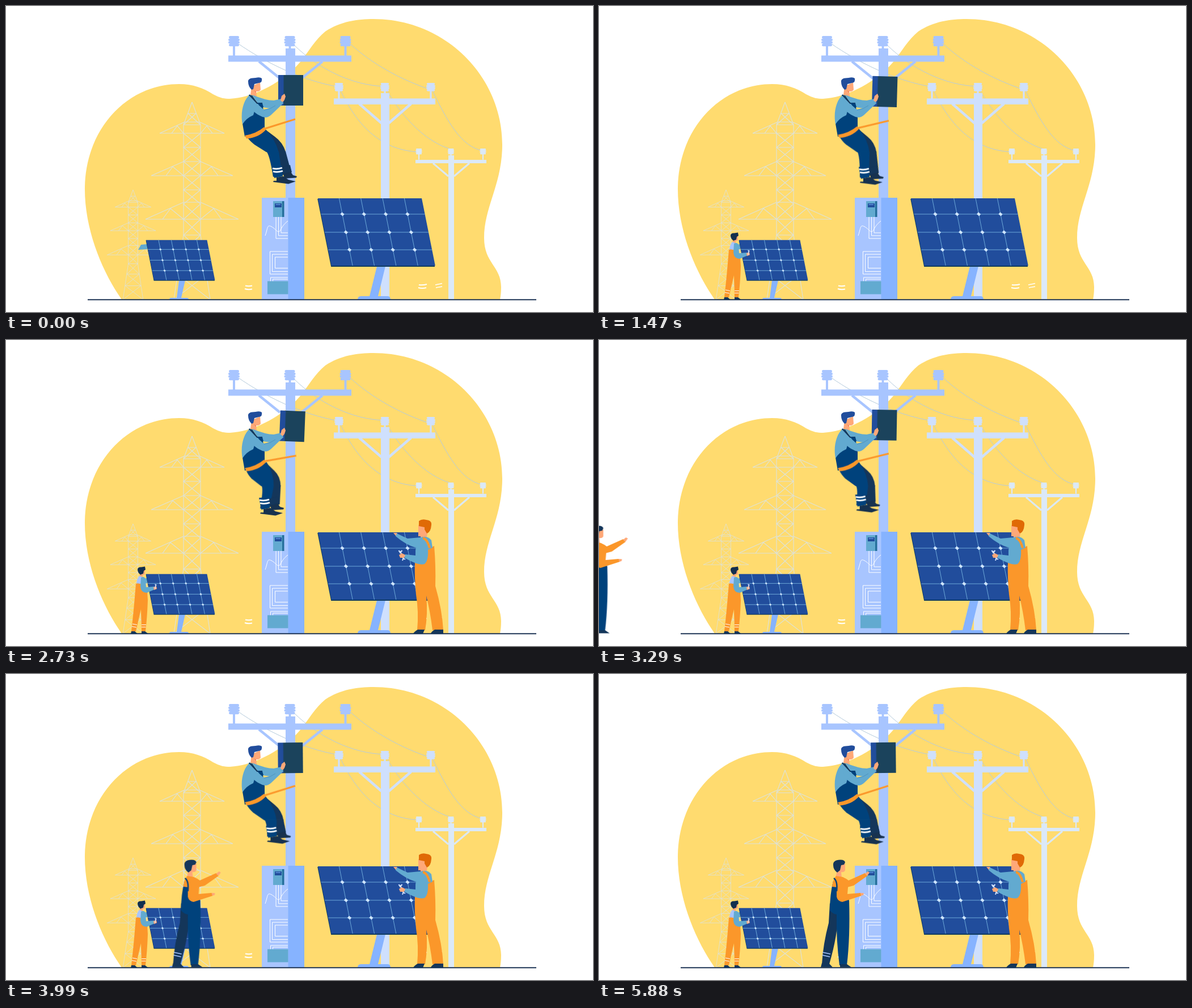
Write an HTML page without scripts that moves like this. It is 1035 px wide and 541 px high and loops after 6300 ms.

```html
<!DOCTYPE html>
<html lang="en">
<head>
<meta charset="utf-8">
<title>Power line workers</title>
<style>
  html, body { margin: 0; width: 100%; height: 100%; overflow: hidden; background: #fff; }
  svg { display: block; width: 100%; height: 100%; }

  .pale { fill: #a8c5ff; } .mid { fill: #86b3ff; } .teal { fill: #62aad0; }
  .navy { fill: #00427c; } .dark { fill: #14365a; } .blue { fill: #214d9c; }
  .orange { fill: #fb972a; } .skin { fill: #ffa878; } .ginger { fill: #e06a06; }
  .line { fill: none; stroke: #fff; }

  .anim { animation: 6300ms linear -10ms infinite; }
  .fitter { animation-name: fitter; }
  .panelist { animation-name: panelist; }
  .metering { animation-name: metering; }
  .box { animation-name: box; transform-origin: 502px 149px; }
  .belt { animation-name: belt; }
  .strap { animation-name: strap; transform-origin: 457px 217px; }
  .thigh { animation-name: thigh; transform-origin: 0 228px; }
  .shin { animation-name: shin; transform-origin: 0 258px; }
  .cuff { animation-name: cuff; }

  /* walkers slide in one after another */
  @keyframes fitter {
    0% { transform: translateX(-282px); animation-timing-function: steps(20); }
    22.222%, 100% { transform: none; }
  }
  @keyframes panelist {
    0%, 22.222% { transform: translateX(600px); animation-timing-function: steps(19); }
    43.333%, 100% { transform: none; }
  }
  @keyframes metering {
    0%, 44.444% { transform: translateX(-656px); animation-timing-function: steps(20); }
    66.667%, 100% { transform: none; }
  }

  /* climber sways on the strap */
  @keyframes box {
    0% { transform: translate(0, 0) rotate(0deg); }
    11.11% { transform: translate(.8px, 1.2px) rotate(.6deg); }
    23.33% { transform: translate(1.7px, 2.4px) rotate(1.6deg); }
    43.33% { transform: translate(2.8px, 3.4px) rotate(2.3deg); }
    57.78% { transform: translate(0, 0) rotate(.2deg); }
    73.33% { transform: translate(-1.4px, -2.2px) rotate(-1.7deg); }
    93.33%, 100% { transform: translate(-.6px, -1px) rotate(-.6deg); }
  }
  @keyframes belt {
    0% { transform: translateY(0); }
    43.33%, 57.78% { transform: translateY(-2.5px); }
    73.33%, 100% { transform: translateY(-2px); }
  }
  @keyframes strap {
    0% { transform: translateY(0) rotate(0deg); }
    11.11% { transform: translateY(-.3px) rotate(2deg); }
    23.33% { transform: translateY(-1px) rotate(4deg); }
    43.33% { transform: translateY(-2.5px) rotate(7.5deg); }
    57.78% { transform: translateY(-2.5px) rotate(1.2deg); }
    73.33% { transform: translateY(-2px) rotate(-2deg); }
    93.33%, 100% { transform: translateY(-2px) rotate(-.3deg); }
  }
  @keyframes thigh {
    0% { transform: skewX(0deg); }
    11.11% { transform: skewX(-1.9deg); }
    23.33% { transform: skewX(-7.6deg); }
    43.33% { transform: skewX(-16.7deg); }
    57.78% { transform: skewX(-9.5deg); }
    73.33% { transform: skewX(-3.8deg); }
    93.33%, 100% { transform: skewX(-5.7deg); }
  }
  @keyframes shin {
    0% { transform: translateX(0) skewX(0deg) scaleY(1); }
    11.11% { transform: translateX(-1px) skewX(-5deg) scaleY(1.045); }
    23.33% { transform: translateX(-4px) skewX(-8.7deg) scaleY(1.03); }
    43.33% { transform: translateX(-9px) skewX(-19.3deg) scaleY(.91); }
    57.78% { transform: translateX(-5px) skewX(-16.2deg) scaleY(.705); }
    73.33% { transform: translateX(-2px) skewX(-6.3deg) scaleY(.614); }
    93.33%, 100% { transform: translateX(-3px) skewX(-11.2deg) scaleY(.69); }
  }
  @keyframes cuff {
    0% { transform: translate(0, 0); }
    11.11% { transform: translate(-5px, 2px); }
    23.33% { transform: translate(-11px, 1.5px); }
    43.33% { transform: translate(-23px, -4px); }
    57.78% { transform: translate(-14px, -13px); }
    73.33% { transform: translate(-5px, -17px); }
    93.33%, 100% { transform: translate(-9px, -13.5px); }
  }
</style>
</head>
<body>
<svg viewBox="0 0 1035 541" xmlns="http://www.w3.org/2000/svg">
  <defs>
    <g id="cap">
      <rect x="-7" y="1" width="14" height="17"/>
      <rect x="-9" width="18" height="4.400" rx="2.200"/>
      <rect x="-10" y="4.600" width="20" height="4.400" rx="2.200"/>
      <rect x="-10" y="9.200" width="20" height="4.400" rx="2.200"/>
      <rect x="-9" y="13.800" width="18" height="4.400" rx="2.200"/>
      <rect x="-2" y="17" width="4" height="18"/>
    </g>
    <g id="tower" fill="none">
      <path vector-effect="non-scaling-stroke" d="M0 0L-15 40V235L-32 349M0 0L15 40V235L32 349M-7 20H7M-15 40H15
        M-57 55H57M-57 55L-13 35H13L57 55M-36 55L-26 42L-15 55M36 55L26 42L15 55
        M-72 130H72M-72 130L-15 105H15L72 130M-46 130L-34 114L-15 130M46 130L34 114L15 130
        M-82 207H82M-82 207L-15 177H15L82 207M-52 207L-38 188L-15 207M52 207L38 188L15 207"/>
      <path vector-effect="non-scaling-stroke" d="M-7 20L15 40M7 20L-15 40M-15 55L15 80L-15 105L15 130L-15 155L15 180L-15 207L15 235L-20 268L25 305L-32 349
        M15 55L-15 80L15 105L-15 130L15 155L-15 180L15 207L-15 235L20 268L-25 305L32 349
        M-15 80H15M-15 155H15M-15 235H15M-20 268H20M-25 305H25"/>
    </g>
    <path id="stud" d="M0-3.600L3.600 0L0 3.600L-3.600 0Z"/>
    <g id="studs">
      <use href="#stud" x="37.4"/><use href="#stud" x="75.7"/>
      <use href="#stud" x="114"/><use href="#stud" x="152.4"/>
    </g>
    <g id="panel" transform="skewX(11.3)">
      <path d="M-1 1V121H182V118H2V1Z" fill="#0f3b60"/>
      <rect class="blue" width="183" height="119"/>
      <path vector-effect="non-scaling-stroke" d="M0 28H183M0 60H183M0 91H183M37.4 0V119M75.7 0V119M114 0V119M152.4 0V119" stroke="#74b2de" stroke-width=".9"/>
      <g fill="#cfe6ff"><use href="#studs" y="28"/><use href="#studs" y="60"/><use href="#studs" y="91"/></g>
    </g>
  </defs>

  <path fill="#ffdb6f" d="M204 519C170 470 138 395 139 320C141 215 215 138 305 138C330 138 348 145 365 156C378 163 385 164 395 164C440 162 495 130 522 95C535 78 545 60 563 45C590 27 620 23 648 23C775 23 875 125 875 245C875 315 843 355 843 410C843 455 873 460 873 497Q873 510 871 519Z"/>

  <g stroke="#d6e4ee" opacity=".85">
    <use href="#tower" x="328" y="170" stroke-width="1.1"/>
    <use href="#tower" transform="translate(224 325) scale(.556)" stroke-width=".8"/>
  </g>

  <!-- wires -->
  <g fill="none" stroke="#b5cbdc" stroke-width="1">
    <path d="M410 67C455 98 520 132 587 143M509 70C550 110 610 141 668 142M607 67C645 102 695 130 749 148"/>
    <path d="M590 150C612 195 650 255 728 258M672 150C700 198 740 240 784 253M752 150C778 203 802 249 841 256"/>
  </g>

  <!-- far poles -->
  <g fill="#dbe9f8" stroke="#dbe9f8" stroke-width="0">
    <path d="M780 264H790V519H780ZM722 272H847V278H722Z"/>
    <path d="M753 278L780 301M817 278L790 301" stroke-width="3"/>
    <use href="#cap" transform="translate(728 252) scale(.56)"/>
    <use href="#cap" transform="translate(784.5 252) scale(.56)"/>
    <use href="#cap" transform="translate(841 252) scale(.56)"/>
  </g>
  <g fill="#cfe0fd" stroke="#cfe0fd" stroke-width="0">
    <path d="M661 154H676V519H661ZM578 163.500H757V174H578Z"/>
    <path d="M623 173L662 207M714 173L675 207" stroke-width="4.500"/>
    <use href="#cap" transform="translate(587 136) scale(.8)"/>
    <use href="#cap" transform="translate(668 136) scale(.8)"/>
    <use href="#cap" transform="translate(749 136) scale(.8)"/>
  </g>

  <!-- main pole -->
  <g class="pale" stroke="#a8c5ff" stroke-width="0">
    <path d="M493 75H510V340H493ZM392 87.500H609V98.500H392Z"/>
    <path d="M446 98L483 128M558 98L521 128" stroke-width="4.500"/>
    <use href="#cap" x="402" y="53"/><use href="#cap" x="500.500" y="53"/><use href="#cap" x="598.500" y="53"/>
  </g>

  <!-- cabinet -->
  <rect class="pale" x="451" y="339" width="47" height="180"/>
  <rect class="mid" x="497.500" y="339" width="28.500" height="180"/>
  <g class="line" stroke-width="1">
    <path d="M457 406C462 392 460 386 468 390S480 404 484 396S492 384 497 380"/>
    <path d="M476 372V411H497M480.500 372V406H497M485 372V401H497"/>
    <path d="M497 434H465.500V474H497M497 439H469.500V469.500H497M497 444H474.500V463.500H497"/>
    <path d="M466.500 487V480H497M470.500 487V483H497"/>
  </g>
  <rect class="teal" x="461" y="486.500" width="36.500" height="23"/>
  <rect class="teal" x="471" y="345" width="19" height="28"/>
  <rect x="487" y="345" width="3.500" height="28" fill="#26709c"/>
  <rect class="blue" x="474" y="349" width="12" height="7"/>
  <path d="M475.500 351H484" stroke="#7fb6ff"/>

  <!-- solar panels -->
  <path class="mid" d="M654 460H669L656 513H673Q678 513 678 519H620Q620 513 626 513H641Z"/>
  <use href="#panel" transform="translate(550 340)"/>
  <path class="mid" d="M305 485H316L309 516H319Q322 516 322 519H288Q288 516 291 516H301Z"/>
  <path class="teal" d="M233 431L238 422L249 421V430Z"/>
  <use href="#panel" transform="translate(247 413.700) scale(.587 .595)"/>

  <g class="line" stroke-width="2">
    <path d="M422 494.500Q428 496 434 494.500M421 500Q427 502 434 500.500"/>
    <path d="M728 493Q735 494 742 492M727 498Q734 500 741 498"/>
    <path d="M757 493L769 490.500M758 498L769 496" stroke-width="1.400"/>
  </g>

  <path d="M144 519.200H935" stroke="#1f3556" stroke-width="2"/>

  <!-- climber -->
  <g>
    <g class="anim box">
      <rect x="480" y="122" width="44" height="54" fill="#1b435c"/>
      <rect class="blue" x="480" y="122" width="9.500" height="54"/>
    </g>

    <g class="anim shin">
      <path class="dark" d="M478 257H493L503 294L487 299Z"/>
      <path class="navy" d="M459 257Q465 263 471 302L487 300L481 257Z"/>
    </g>
    <g class="anim thigh">
      <path class="dark" d="M454 216L474 231Q488 241 493.300 258.300H478Z"/>
      <path class="navy" d="M424 230L456 216Q475 236 481 258.300H459L438 245Q429 238 424 230Z"/>
    </g>
    <g class="anim cuff">
      <path class="dark" d="M486 285L501 281L504 294L488 298Z"/>
      <path class="navy" d="M469 283L486 282L488 301L473 304Z"/>
      <path class="line" d="M470 287Q478 289 487 286M471 292.500Q479 294.500 488 291.500" stroke-width="2.800"/>
      <path fill="#17324f" d="M489 297L502 293L506 299L513 301L512 303.500L491 305Z"/>
      <path fill="#17324f" d="M477 303L489 301L498 307L511 310L498 314.500L471 311L472 309H477Z"/>
    </g>

    <path class="navy" d="M428 157L434 158L443 171L452 172L456 198V217L421 231L417 208L430 180Z"/>
    <path class="teal" d="M430 157C418 166 413 190 417 209Q424 198 436 193L442 172L431 157Z"/>
    <path class="anim belt orange" d="M421 229Q441 226 455 214L458 219Q445 233 424 234.500Z"/>
    <path class="anim strap" d="M456 217L510 200" stroke="#fb972a" stroke-width="3.400"/>

    <path class="skin" d="M433 142L448 135L449 148Q446 152 441 151L442 160L431 157Z"/>
    <path fill="#f4875c" d="M437 149L441 151V154Z"/>
    <path class="blue" d="M427 134Q426 127 440 127Q448 125 451 128Q452 136 446 136L438 138L436 147L433 148Q427 142 427 134Z"/>

    <path class="teal" d="M434 157Q458 167 472 167L486 164L489 172L472 182L453 179L443 171Z"/>
    <path class="teal" d="M431 168Q430 186 448 194Q459 201 468 192L489 172L485 167Q472 181 455 183Q448 179 441 168Z"/>
    <path d="M429 157L443 172H452" fill="none" stroke="#14365a" stroke-width="2"/>
    <path class="navy" d="M443 171L452 172L454 179Q448 180 443 171Z"/>
    <path d="M455 184Q466 183 475 176" fill="none" stroke="#4b8fba" stroke-width=".8"/>
    <path class="skin" d="M484 167L486 159L491 155L493 160L491 166L488 170Z"/>
  </g>

  <!-- small fitter -->
  <g class="anim fitter">
    <path class="skin" d="M237 408L245 405V414L241 416V420H235Z"/>
    <path fill="#122f4f" d="M232 406Q232 401 239 401.500L245 400.500L246 406L243 408L242 413L237 415Q232 411 232 406Z"/>
    <path class="pale" d="M235 417Q230 423 230 432L241 430L243 420Z"/>
    <path class="orange" d="M229 431Q238 427 249 443L250 460Q249 490 246 515H239L238 476L229 515H221Q225 480 227 455Z"/>
    <path class="teal" d="M238 420Q245 417 246 424L247 437L261 436L262 441L248 447Q238 447 237 436Z"/>
    <path class="skin" d="M260 437L265 435L266 440L261 442Z"/>
    <path d="M264 432L263 440M262.500 432L265.500 433.500" stroke="#cfe0fd" stroke-width="1.500"/>
    <path class="line" d="M223 502L231 503.500M222 506.500L230 508M239 503.500H247M239 507.500H246.500" stroke-width="1"/>
    <path class="dark" d="M221 515H227L232 519.500H220ZM239 515H245L251 519.500H239Z"/>
  </g>

  <!-- panel worker -->
  <g class="anim panelist">
    <path class="skin" d="M683 341L689 341L692 345L688 347Z"/>
    <path class="teal" d="M689 342L708 351L730 349L740 356L722 367Q705 362 687 347Z"/>
    <path class="skin" d="M727 327L740 330L743 342L741 352L731 351V347H727Z"/>
    <path class="ginger" d="M728 329L728 320Q733 316 741 318Q751 319 750 327Q749 340 742 342L738 335V331Z"/>
    <path class="orange" d="M721 392L744 370L755 364Q758 400 757 435Q769 477 771 513H752Q748 480 741 452Q744 485 739 513H725Q728 480 723 450Q720 420 721 392Z"/>
    <path class="teal" d="M729 350Q742 344 750 354L752 367L744 371Q745 390 738 396Q728 400 701 384L704 379L722 381Q721 362 729 350Z"/>
    <path d="M735 350Q743 352 747 368" fill="none" stroke="#fb972a" stroke-width="4"/>
    <path d="M695 373L701 388M692.500 372L695 376L698.500 372M699 390L700.500 386L704 388" fill="none" stroke="#cfe0fd" stroke-width="2"/>
    <path class="skin" d="M693 380L698 377L704 380L702 385L695 385Z"/>
    <path class="dark" d="M726 512H738L735 519.500H718Q719 516 726 512ZM756 512H771V519.500H749Q749 516 756 512Z"/>
  </g>

  <!-- meter worker -->
  <g class="anim metering">
    <path class="dark" d="M407 405L422 420Q421 462 406 513H393Q395 478 405 440Z"/>
    <path d="M394 492L408 495M393.500 497L407 500" stroke="#a8c5ff" stroke-width="1.500"/>
    <path class="navy" d="M413 366Q407 390 407 418Q413 425 419 425Q418 470 424 515H437Q443 465 441 400L425 380Z"/>
    <path class="skin" d="M424 338L434 335V347Q432 351 427 350L428 360H417L420 347Z"/>
    <path class="dark" d="M413 338Q412 329 425 328.500Q433 328 434 333L432 337L427 338L425 347L420 351Q413 346 413 338Z"/>
    <path class="orange" d="M420 358Q432 358 440 365L469 352L473 357L449 374L434 378Z"/>
    <path class="orange" d="M418 357Q412 364 411 376L419 377V394Q421 402 429 403L463 392L461 387L438 389L440 366L430 359Z"/>
    <path d="M414 361Q421 366 419 384" fill="none" stroke="#00427c" stroke-width="2.500"/>
    <path class="skin" d="M469 353L474 349L477 351L473 357ZM461 387L467 387.500L466 391L462 392Z"/>
    <path class="dark" d="M393 511H405L412 518.500H391ZM425 513H437L445 518.500H425Z"/>
  </g>
</svg>
</body>
</html>
```
